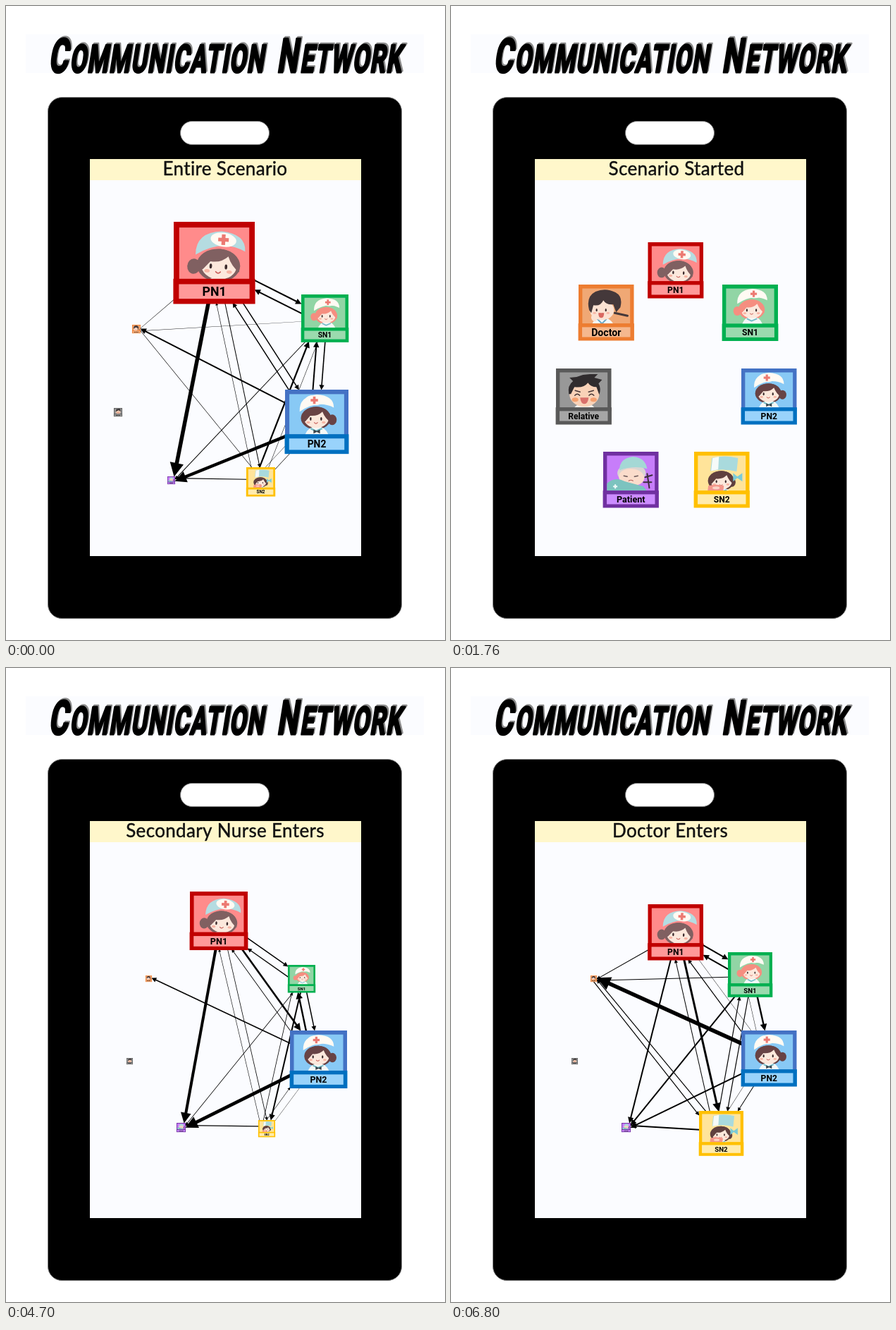
Recreate the animation shown at these times as an HTML page with a canvas. Size 623 by 899 pixels, loop 8 s.

```html
<!DOCTYPE html>
<html lang="en">
<head>
<meta charset="utf-8">
<title>Communication Network</title>
<style>
html, body { margin: 0; width: 100%; height: 100%; overflow: hidden; background: #fff; }
canvas { display: block; }
</style>
</head>
<body>
<canvas id="stage" width="623" height="899"></canvas>
<script>
const ctx = document.getElementById('stage').getContext('2d');
const LOOP = 8000;

function rect(x, y, w, h, color) {
  ctx.fillStyle = color;
  ctx.fillRect(x, y, w, h);
}

function pill(x, y, w, h, r, color) {
  ctx.beginPath();
  ctx.roundRect(x, y, w, h, r);
  ctx.fillStyle = color;
  ctx.fill();
  ctx.strokeStyle = '#7f7f7f';
  ctx.lineWidth = 1;
  ctx.stroke();
}

function oval(x, y, rx, ry, color, turn = 0) {
  ctx.beginPath();
  ctx.ellipse(x, y, rx, ry, turn, 0, Math.PI * 2);
  ctx.fillStyle = color;
  ctx.fill();
}

function shape(d, color) {
  ctx.fillStyle = color;
  ctx.fill(new Path2D(d));
}

function line(d, color, width) {
  ctx.strokeStyle = color;
  ctx.lineWidth = width;
  ctx.lineCap = 'round';
  ctx.stroke(new Path2D(d));
}

function cross(x, y, r, color) {
  rect(x - r, y - r * 0.35, r * 2, r * 0.7, color);
  rect(x - r * 0.35, y - r, r * 0.7, r * 2, color);
}

// Eyes, cheeks and mouth; the origin lies between the eyes
function features() {
  for (const side of [-1, 1]) {
    oval(side * 6.5, 0, 1.1, 2.1, '#3b2a2c');
    oval(side * 9.5, 4.2, 2.3, 1.4, '#f7b5a4');
  }
  line('M-2 4.5q2 2.4 4 0', '#c9605a', 1);
}

function nurse({ hair, bun, cap = '#fffaf3', crossX, collar = '#75bdc8', tilt = 0 }) {
  ctx.rotate(tilt);
  oval(bun, 1, 5.5, 6.5, hair);
  oval(0, -1, 18.5, 14, hair);
  shape('M-14 21Q-10 9 1 9Q12 9 16 21Z', '#f4f8f7');
  oval(0.5, -0.5, 15, 11.5, '#fce8dc');
  shape('M-17 4Q-18 -14 1 -15Q19 -14 18 4Q11 -1 8 -9Q2 -3 -7 -4L-13 3Z', hair);
  line('M-6 12L0 15L7 12', collar, 2);
  if (crossX === undefined) {
    shape('M-15 -15L-13 -33Q5 -38 24 -33L22 -14Q5 -19 -15 -15Z', '#a9dadd');
    shape('M-12 -33L-3 -35L-4 -17L-14 -15Z', '#f6faf8');
  } else {
    shape('M-20 -9Q-21 -28 1 -30Q22 -29 22 -14Q2 -24 -20 -9Z', cap);
    oval(crossX, -23, 11, 6, '#fffaf3', 0.1);
    cross(crossX, -23, 4.5, '#ec7a72');
  }
  features();
}

// Portraits live in a card 78 units wide, drawn around the face
const portraits = {
  PN1() {
    ctx.scale(1.13, 1.13);
    nurse({ hair: '#806061', bun: -21, cap: '#b5dce1', crossX: 3, tilt: 0.06 });
  },
  SN1() {
    nurse({ hair: '#f58e80', bun: -20, crossX: 3 });
  },
  PN2() {
    nurse({ hair: '#684345', bun: 20, crossX: -2 });
    shape('M-3 13l4 2 4 -2v5l-4 -2 -4 2Z', '#39434b');
  },
  SN2() {
    nurse({ hair: '#60403f', bun: 15 });
    shape('M17 -12l6 5 7 -5v12l-7 -5 -6 5Z', '#7bcbd7');
    shape('M-18 6Q-7 3 4 6L3 14H-19Z', '#f4978b');
    oval(-7, 9, 5, 2, '#fbd3c6');
  },
  Patient() {
    oval(0, -6, 20, 13, '#d9d5d2');
    oval(0, 0, 18, 12, '#fadccb', 0.1);
    shape('M-17 -10Q-17 -27 2 -29Q19 -28 22 -12Q3 -17 -17 -10Z', '#a4d8d5');
    line('M-11 -2l5 1M4 -1l5 -1', '#695657', 1.4);
    line('M-4 5q3 -2 6 0', '#b7615c', 1.2);
    shape('M-35 9Q-24 -2 -9 6L17 13L22 20H-35Z', '#7cc3bf');
    line('M22 -5L25 15M19 0L29 -3M17 7H28', '#3c3039', 2);
    cross(-23, 13, 3, '#eef9f7');
  },
  Relative() {
    shape('M-15 20Q-10 13 0 13T15 20Z', '#f4f2ee');
    oval(0, 0, 21, 18, '#f9d2b8');
    shape('M-22 0Q-24 -12 -16 -18L-21 -23L-11 -24L-2 -27L8 -28L19 -28L14 -23L25 -20L20 -15Q24 -8 21 1L17 -10Q9 -10 5 -16Q-1 -8 -14 -10L-19 0Z', '#302c2e');
    for (const side of [-1, 1]) {
      line(`M${side * 10 - 3.5} 2q3.5 -4 7 0`, '#473737', 1.3);
      line(`M${side * 6} -3l${side * 7} -2`, '#473737', 1.5);
      oval(side * 13, 8, 4.5, 3, '#f4a06f');
    }
    shape('M-6 5H6Q5 14 0 14T-6 5Z', '#d9706b');
  },
  Doctor() {
    shape('M-14 21Q-8 10 1 10Q12 10 18 21Z', '#f4f9fb');
    line('M-5 13L1 19L7 13', '#6ca8c4', 2);
    oval(1, 0, 17, 14, '#fce2d2');
    shape('M-17 0Q-22 -19 -8 -26Q6 -32 20 -25Q31 -19 27 -4L21 3L17 -8Q7 -7 3 -14Q-1 -5 -11 -7L-14 4Z', '#44383a');
    features();
    shape('M-4 4H4Q4 11 0 11T-4 4Z', '#d96861');
    oval(-10, 11, 4, 5, '#fce2d2', -0.4);
    line('M19 4L37 8', '#46393a', 3);
  }
};

// The order also tells outbound links from replies
const role = (edge, fill, tag, face, size = 12, trim = edge) => ({ edge, fill, tag, face, size, trim });
const roles = {
  PN1: role('#c00000', '#ff8b8b', '#ff9999', [43, 43]),
  SN1: role('#00b050', '#91d5a5', '#9bdaae', [41, 36]),
  PN2: role('#4472c4', '#88c9f5', '#99d3fb', [38, 36], 12, '#0070c0'),
  SN2: role('#ffc000', '#ffe49a', '#ffebad', [38, 42]),
  Doctor: role('#ed7d31', '#f0a875', '#f5b88e', [32, 36], 14),
  Relative: role('#595959', '#989898', '#a6a6a6', [40, 36]),
  Patient: role('#7030a0', '#c77dfa', '#cc8cff', [40, 36], 12.5)
};
const order = Object.keys(roles);

function card(name, [x, y, width]) {
  const { edge, fill, tag, face, size, trim } = roles[name];
  ctx.save();
  ctx.translate(x, y);
  ctx.scale(width / 78, width / 78);
  rect(0, 0, 78, 60, edge);
  rect(5.3, 5.5, 67.4, 49.5, fill);
  ctx.save();
  ctx.beginPath();
  ctx.rect(5.3, 5.5, 67.4, 49.5);
  ctx.clip();
  ctx.translate(...face);
  portraits[name]();
  ctx.restore();
  rect(-0.4, 54.8, 78.8, 24.2, trim);
  rect(5, 60, 68, 14, tag);
  ctx.fillStyle = '#000';
  ctx.font = `bold ${size}px Roboto, sans-serif`;
  ctx.textAlign = 'center';
  ctx.fillText(name, 39, 67 + size * 0.36);
  ctx.restore();
}

// Straight line whose head grows with its weight; faint lines have none
function arrow(x, y, angle, len, w) {
  const head = w < 0.6 ? 0 : 2 + 3.2 * w;
  ctx.save();
  ctx.translate(x, y);
  ctx.rotate(angle);
  rect(0, -w / 2, len - head * 0.8, w, '#000');
  shape(`M${len} 0L${len - head} ${-head / 2}V${head / 2}Z`, '#000');
  ctx.restore();
}

// Joins two cards edge to edge; replies run in a lane on the lower left
function link(cards, from, to, weight) {
  const reply = order.indexOf(from) > order.indexOf(to);
  const mid = ([x, y, size]) => [x + size / 2, y + size / 2];
  const [ax, ay] = mid(cards[from]);
  const [bx, by] = mid(cards[to]);
  const angle = Math.atan2(by - ay, bx - ax);
  const side = by > ay ? 1 : -1;
  const shift = (x, y, size) => {
    const lane = side * Math.max(-size * 0.3, Math.min(size * 0.3, reply ? 9 : -3));
    return [x - Math.sin(angle) * lane, y + Math.cos(angle) * lane];
  };
  const [px, py] = shift(ax, ay, cards[from][2]);
  const [qx, qy] = shift(bx, by, cards[to][2]);
  const dir = Math.atan2(qy - py, qx - px);
  const dx = Math.cos(dir);
  const dy = Math.sin(dir);
  const toEdge = (offset, d, half) => (half - Math.sign(d) * offset) / Math.abs(d);
  const exit = (ox, oy, ux, uy, size) => Math.min(toEdge(ox, ux, size / 2), toEdge(oy, uy, size / 2));
  const start = exit(px - ax, py - ay, dx, dy, cards[from][2]) - 1;
  const end = exit(qx - bx, qy - by, -dx, -dy, cards[to][2]) - 0.5;
  arrow(px + dx * start, py + dy * start, dir, Math.hypot(qx - px, qy - py) - start - end, weight);
}

// Cards are [left, top, size]
const ring = {
  PN1: [279.5, 335, 78.5], SN1: [385, 395, 79], PN2: [412, 514, 78.5], SN2: [345, 632, 78.5],
  Doctor: [181, 395, 78.5], Relative: [149, 514, 78.5], Patient: [216, 632, 78.5]
};
const waiting = { ...ring, Doctor: [198, 436, 9], Relative: [171, 553, 9], Patient: [242, 645, 13] };

const scenes = [
  {
    start: 0,
    title: 'Entire Scenario',
    cards: {
      PN1: [238, 306, 115], SN1: [419, 409, 67], PN2: [396, 544, 90], SN2: [341, 654, 41],
      Doctor: [179, 452, 12], Relative: [153, 570, 12], Patient: [229, 667, 11]
    },
    links: {
      PN1: { Patient: 5.5, SN1: 2, PN2: 1.5, SN2: 1, Doctor: 0.5 },
      SN1: { PN1: 2, PN2: 1.6, SN2: 0.5, Patient: 1, Doctor: 0.4 },
      PN2: { Patient: 4.5, Doctor: 2, SN1: 2, PN1: 1.5, SN2: 0.5 },
      SN2: { SN1: 2.2, Patient: 1.1, PN1: 0.6, PN2: 0.4, Doctor: 0.5 }
    }
  },
  { start: 500, title: 'Scenario Started', titleX: 320, cards: ring, links: {} },
  {
    start: 2600,
    title: 'Handover Ends',
    cards: { ...waiting, PN1: [254, 315, 94], SN1: [407, 429, 32], SN2: [359, 641, 28] },
    links: { PN1: { Patient: 7, SN1: 0.7, SN2: 0.7 }, PN2: { Patient: 3.6, PN1: 2.6 } }
  },
  {
    start: 4700,
    title: 'Secondary Nurse Enters',
    cards: { ...waiting, PN1: [261, 317, 82], SN1: [400, 421, 39], PN2: [403, 514, 81], SN2: [358, 641, 24] },
    links: {
      PN1: { Patient: 4, PN2: 2.6, SN1: 1.5, SN2: 0.8 },
      SN1: { SN2: 2, PN2: 1.5, PN1: 1.3, Patient: 0.8 },
      PN2: { Patient: 4.8, SN1: 2.4, Doctor: 1.5, PN1: 0.9, SN2: 0.3 },
      SN2: { Patient: 1.1, SN1: 0.8, PN1: 0.6, PN2: 0.6 }
    }
  },
  {
    start: 6800,
    title: 'Doctor Enters',
    cards: { ...waiting, SN1: [393, 403, 63], SN2: [352, 628, 63] },
    links: {
      PN1: { SN2: 3, Patient: 2, SN1: 2, Doctor: 1.1, PN2: 0.4 },
      SN1: { PN2: 2.4, PN1: 2, Patient: 2, SN2: 1.2, Doctor: 1.1 },
      PN2: { Doctor: 5.5, Patient: 2, PN1: 1.2, SN2: 1, SN1: 0.5 },
      SN2: { Patient: 1.9, SN1: 1.2, Doctor: 1.2, PN1: 1, PN2: 0.4 },
      Doctor: { SN2: 1.2 }
    }
  }
];

// Slanted condensed lettering with a large initial
function heading(dx, dy, color) {
  const part = (text, x, size) => {
    ctx.save();
    ctx.transform(0.62, 0, -0.16, 1, x + dx, 93.5 + dy);
    ctx.font = `bold ${size}px Roboto, sans-serif`;
    ctx.fillText(text, 0, 0);
    ctx.strokeText(text, 0, 0);
    ctx.restore();
  };
  ctx.textAlign = 'left';
  ctx.letterSpacing = '2.3px';
  ctx.lineJoin = 'round';
  ctx.lineWidth = 3;
  ctx.fillStyle = ctx.strokeStyle = color;
  part('C', 60, 67);
  part('OMMUNICATION', 90, 54.5);
  part('N', 384, 67);
  part('ETWORK', 417, 54.5);
}

function badge(title, titleX) {
  rect(0, 0, 623, 899, '#fff');
  rect(28, 40, 565, 55, '#fbfcff');
  heading(1.8, -1.6, '#8c8c8c');
  heading(0, 0, '#000');
  pill(59.5, 129.5, 502, 739, 20, '#000');
  pill(247.5, 163.5, 126, 33, 16.5, '#fff');
  rect(119, 217, 385, 563, '#fbfcff');
  rect(119, 217, 385, 30, '#fff7cb');
  ctx.font = '26px Lato, sans-serif';
  ctx.textAlign = 'center';
  ctx.letterSpacing = '0.35px';
  ctx.fillStyle = ctx.strokeStyle = '#111';
  ctx.lineWidth = 0.4;
  ctx.fillText(title, titleX, 240);
  ctx.strokeText(title, titleX, 240);
  ctx.letterSpacing = '0px';
}

function draw(now) {
  const t = now % LOOP;
  const { title, titleX = 311, cards, links } = scenes.findLast(scene => t >= scene.start);
  badge(title, titleX);
  for (const from in links) {
    for (const to in links[from]) link(cards, from, to, links[from][to]);
  }
  for (const name of order) card(name, cards[name]);
}

let origin;
function tick(now) {
  origin ??= now;
  draw(now - origin);
  requestAnimationFrame(tick);
}
draw(0);
requestAnimationFrame(tick);
</script>
</body>
</html>
```
